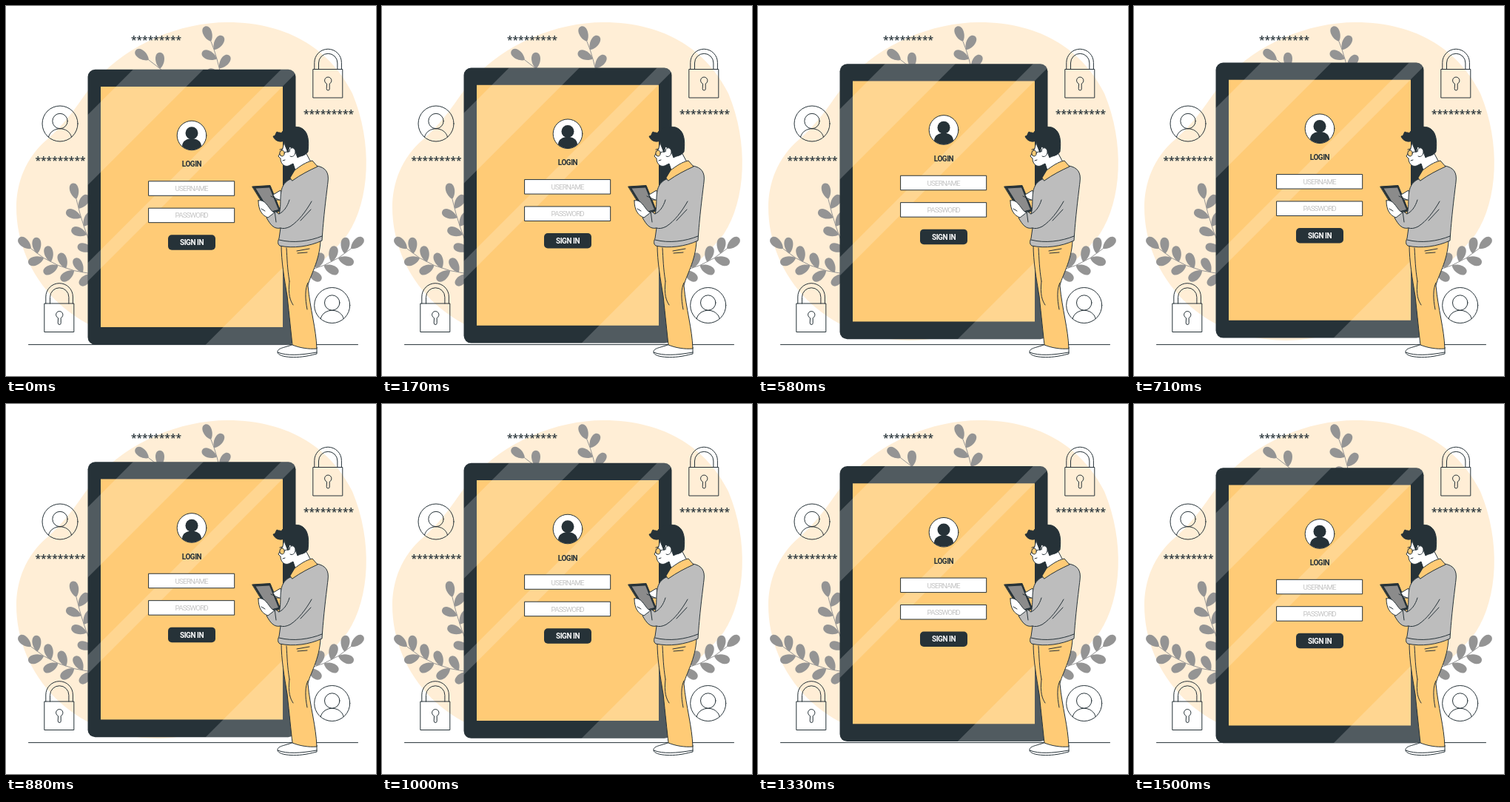
Write an HTML page that moves like this. It is 500 by 500 pixels and loops after 1.54 s.

```html
<!DOCTYPE html>
<html lang="en">
<head>
<meta charset="utf-8">
<title>Login</title>
<style>
html, body { margin: 0; width: 100%; height: 100%; overflow: hidden; background: #fff; }
svg { display: block; width: 100vw; height: 100vh; }
.line { fill: none; stroke: #263238; stroke-linecap: round; stroke-linejoin: round; }
.white { fill: #fff; }
.gold { fill: #ffcb76; }
.gray { fill: #bdbdbd; }
.dark { fill: #263238; }
text { font: 600 10px Roboto, sans-serif; text-anchor: middle; letter-spacing: -.5px; }
.hint { font-size: 9.8px; font-weight: 400; letter-spacing: -.9px; fill: #c4c4c4; }
.stars { font: 600 13.8px "Open Sans", sans-serif; letter-spacing: 0; }
</style>
</head>
<body>
<svg viewBox="0 0 500 500">
  <defs>
    <clipPath id="outline"><rect x="110.5" y="86.3" width="281" height="372" rx="10"/></clipPath>
    <path id="leaf" d="M0 0C7-8 22-8 22 0S7 8 0 0" stroke="none"/>
    <g id="lock" class="line">
      <path d="M415.2 85.5h39.6v38.5h-39.6zM416.8 85.500V76.500a18.300 18.300 0 0 1 36.600 0v9M422.500 85.500V77a12.700 12.700 0 0 1 25.400 0v8.500"/>
      <path d="M433.200 105a4.700 4.700 0 1 1 4 0v7a2 2 0 0 1-4 0z"/>
    </g>
    <g id="user" class="line">
      <circle r="24"/>
      <circle cy="-3.500" r="10.200"/>
      <path d="M-15.500 18C-12 3 12 3 15.500 18"/>
    </g>
    <text id="stars" class="stars dark">*********</text>
  </defs>

  <path fill="#ffeed6" d="M299 22C385 22 440 62 468 118C496 185 492 262 462 308C425 355 385 378 340 405C300 435 250 452 205 452C90 452 14 365 14 272C14 240 26 205 56 180C90 150 100 125 124 98C165 52 235 22 299 22Z"/>

  <g id="plants" fill="#949494" stroke="#949494">
    <g id="spray"></g>
    <use href="#spray" transform="matrix(-1 0 0 1 500 0)"/>
  </g>

  <path class="line" d="M30.500 457.600H475.500"/>
  <use href="#lock"/>
  <use href="#lock" x="-363" y="316.500"/>
  <use href="#user" x="73" y="159"/>
  <use href="#user" x="440.700" y="404.500"/>
  <use href="#stars" x="203" y="51"/>
  <use href="#stars" x="436" y="151"/>
  <use href="#stars" x="73.500" y="214"/>

  <g id="tablet">
    <rect class="dark" x="110.500" y="86.300" width="281" height="372" rx="10"/>
    <rect class="gold" x="128" y="109.500" width="246" height="325"/>
    <path clip-path="url(#outline)" class="white" opacity=".2" d="M172 86H267L110 243V148ZM372 86H397L110 373V348ZM269 459L392 336V459Z"/>
    <g class="line">
      <circle class="white" cx="251" cy="175.500" r="19.800"/>
      <rect class="white" x="193" y="237.300" width="115.700" height="19.500"/>
      <rect class="white" x="193" y="273.700" width="115.700" height="19.500"/>
    </g>
    <circle class="dark" cx="251" cy="172.300" r="8.500"/>
    <path class="dark" d="M238 190C238 176 264 176 264 190A19.500 19.500 0 0 1 238 190Z"/>
    <rect class="dark" x="219" y="309.700" width="64" height="20.500" rx="5"/>
    <text class="dark" x="251" y="218">LOGIN</text>
    <text class="hint" x="250.700" y="251">USERNAME</text>
    <text class="hint" x="250.700" y="287">PASSWORD</text>
    <text class="white" x="251" y="323.700">SIGN IN</text>
  </g>

  <g id="man" class="line">
    <path class="white" d="M367 468C366 462 376 462 389 457L420 461V470C405 474 395 475 385 474.500C375 474 368 472 367 468C380 473 397 472 420 468"/>
    <path class="gold" d="M372 323C372 345 376 368 380 392C383 420 385 440 387 458C397 462 409 464 420 463C419 435 411 410 408 378C410 366 424 345 425 317Z"/>
    <path d="M383 372C381 390 384 398 388 404M408 374C404 382 404 395 407 410M393 331L410 328M394 334L407 333M379 327C380 342 380 354 383 372"/>
    <path class="dark" d="M333 244L357 242.500L371 277L356 281Z"/>
    <path fill="#8b8b8b" stroke="none" d="M337.500 246.500L356 245.500L368 275L357 278Z"/>
    <path class="white" d="M361 255L371 249L373 262L365 262ZM358 257L369 262"/>
    <path class="gray" d="M384 234L420 216C431 218 437 224 435 238C433 255 429 285 427 317C410 325 388 328 370 324C367 322 367 318 369 314L371 300C362 302 357 295 352 286L363 277L369 281C374 265 365 243 384 234Z"/>
    <path d="M413 264C405 278 395 291 384 298Q376 302 371 300M398 290L412 275M369 316C388 321 410 318 427 311M363 277L365 292M383 262C380 272 375 278 369 281"/>
    <path class="white" d="M341 263C352 260 356 278 363 279L354 286C346 283 341 276 341 263ZM345 274L350 277"/>
    <path class="white" d="M377 180L374 192L368 203L371 206C371 213 376 218 382 216L388 213L391 222L412 211L404 196L400 185Z"/>
    <path class="dark" d="M376 182C370 185 363 182 361 176C364 176 364 173 366 170C369 172 370 170 372 172C376 164 388 162 397 164C408 168 410 180 408 197C404 203 398 202 394 205L390 194L383 190L381 198L377 188Z"/>
    <path class="white" d="M383 197C383 189 391 191 391 197C391 202 387 205 384 203"/>
    <path d="M376 198L383 196M374 209L377 208M370 194L374 193"/>
    <ellipse class="gold" cx="373" cy="199" rx="3.200" ry="4"/>
    <path class="gold" d="M384 232L390 222C398 216 405 211 414 209L421 217C410 222 398 228 387 236Z"/>
  </g>
</svg>
<script>
const byId = id => document.getElementById(id);

// Leaves alternate along a quadratic stem and one more sits on its end.
function sprig(group, x0, y0, cx, cy, x1, y1, count) {
  const SPREAD = 50;
  let art = `<path fill="none" d="M${x0} ${y0}Q${cx} ${cy} ${x1} ${y1}"/>`;
  for (let i = 0; i <= count; i++) {
    const t = i / count, s = 1 - t;
    const x = s * s * x0 + 2 * s * t * cx + t * t * x1;
    const y = s * s * y0 + 2 * s * t * cy + t * t * y1;
    const dx = s * (cx - x0) + t * (x1 - cx);
    const dy = s * (cy - y0) + t * (y1 - cy);
    const side = i === count ? 0 : i % 2 ? 1 : -1;
    const angle = Math.atan2(dy, dx) * 180 / Math.PI + side * SPREAD;
    art += `<use href="#leaf" transform="translate(${x} ${y}) rotate(${angle})"/>`;
  }
  byId(group).insertAdjacentHTML('beforeend', art);
}

sprig('spray', 116, 362, 66, 356, 34, 328, 8);
sprig('plants', 291, 98, 286, 70, 277, 48, 4);
sprig('plants', 224, 98, 208, 84, 193, 73, 2);
sprig('plants', 118, 330, 104, 300, 95, 261, 6);

const PERIOD = 1540, RISE = 10, LEAD = 40;

function draw(time) {
  const phase = (time + LEAD) % PERIOD / PERIOD;
  const lift = RISE * (1 - Math.abs(1 - 2 * phase));
  byId('tablet').setAttribute('transform', `translate(0 ${-lift})`);
}

let start;
function tick(now) {
  start ??= now;
  draw(now - start);
  requestAnimationFrame(tick);
}
draw(0);
requestAnimationFrame(tick);
</script>
</body>
</html>
```
